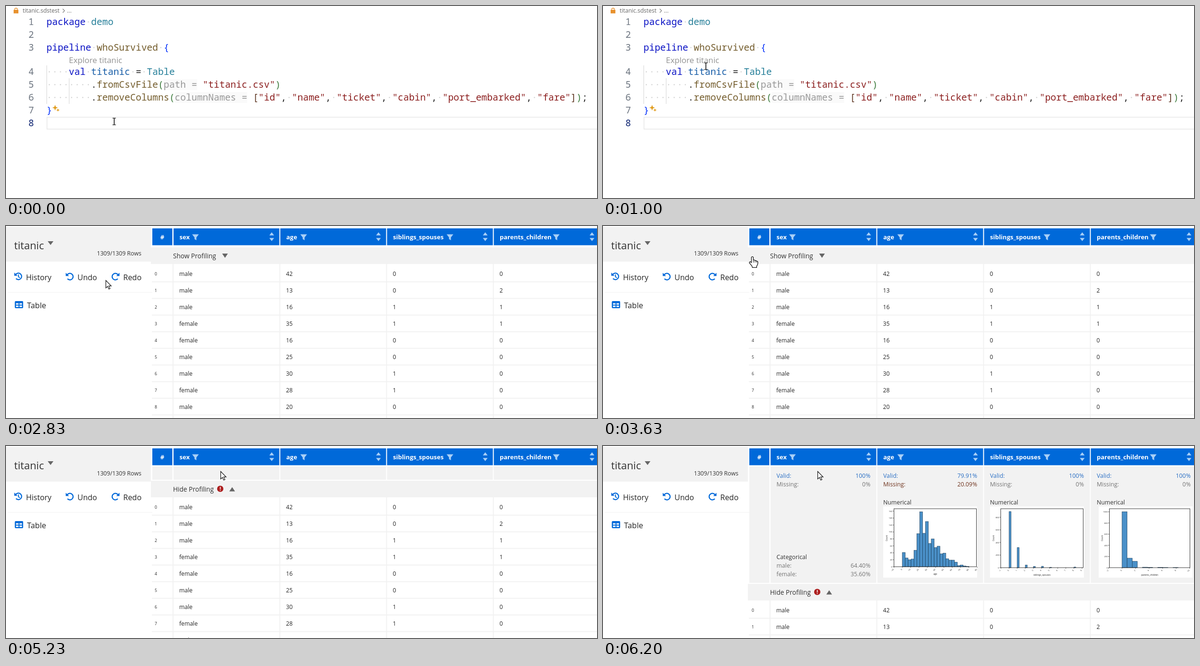
An HTML page with a canvas that plays this animation: 1240x404 px, repeating every 6.96 s.

```html
<!DOCTYPE html>
<html lang="en">
<head>
<meta charset="utf-8">
<title>Table explorer</title>
<style>
html, body { margin: 0; width: 100%; height: 100%; overflow: hidden; background: #fff; }
canvas { display: block; }
</style>
</head>
<body>
<canvas id="stage" width="1240" height="404"></canvas>
<script>
const ctx = document.getElementById('stage').getContext('2d');
const LOOP = 6960;
const OPEN = 1560, LOADED = 1680, EXPAND = 5230, GROW = 690;
const UI = '"Open Sans", "Noto Sans", sans-serif';
const MONO = '"Noto Sans Mono", "DejaVu Sans Mono", monospace';
const BLUE = '#0069d9', GREY = '#f2f2f2', INK = '#252525';
const CH = 11.7, LEFT = 85;

function rect(x, y, w, h, color) {
  ctx.fillStyle = color;
  ctx.fillRect(x, y, w, h);
}

function text(s, x, y, size, color = INK, { font = UI, weight = 400, align = 'left' } = {}) {
  ctx.font = `${weight} ${size}px ${font}`;
  ctx.textAlign = align;
  ctx.fillStyle = color;
  ctx.fillText(s, x, y);
}

function poly(points, fill, stroke, width = 1) {
  ctx.beginPath();
  points.forEach(([x, y]) => ctx.lineTo(x, y));
  ctx.closePath();
  if (fill) { ctx.fillStyle = fill; ctx.fill(); }
  if (stroke) { ctx.strokeStyle = stroke; ctx.lineWidth = width; ctx.stroke(); }
}

function line(points, color, width = 1) {
  ctx.beginPath();
  points.forEach(([x, y]) => ctx.lineTo(x, y));
  ctx.strokeStyle = color;
  ctx.lineWidth = width;
  ctx.stroke();
}

function disc(x, y, r, color) {
  ctx.beginPath();
  ctx.arc(x, y, r, 0, Math.PI * 2);
  ctx.fillStyle = color;
  ctx.fill();
}

// Triangle centred on (x, y); negative h points up
function tri(x, y, w, h, color) {
  poly([[x - w / 2, y - h / 2], [x + w / 2, y - h / 2], [x, y + h / 2]], color);
}

function at(x, y, draw) {
  ctx.save();
  ctx.translate(x, y);
  draw();
  ctx.restore();
}

const clamp = u => Math.max(0, Math.min(1, u));
const smooth = u => u * u * (3 - 2 * u);
const mix = (a, b, u) => a + (b - a) * u;

// CSS "ease" curve: cubic-bezier(.25, .1, .25, 1)
function ease(u) {
  let lo = 0, hi = 1;
  for (let i = 0; i < 20; i++) {
    const s = (lo + hi) / 2, r = 1 - s;
    if (.75 * r * r * s + .75 * r * s * s + s ** 3 < u) lo = s; else hi = s;
  }
  return .3 * (1 - lo) ** 2 * lo + 3 * (1 - lo) * lo * lo + lo ** 3;
}

// ---------- pointers ----------

function arrow(x, y) {
  at(x + .5, y - .5, () => poly([[0, 0], [0, 16], [3.7, 12.6], [6.3, 18.3], [8.9, 17.1],
    [6.3, 11.7], [11.3, 11.7]], '#fff', '#111', 1.2));
}

function hand(x, y) {
  at(x, y, () => {
    ctx.beginPath();
    ctx.moveTo(-2, 12);
    ctx.lineTo(-2, 1);
    ctx.quadraticCurveTo(0, -2, 2, 1);
    ctx.lineTo(2, 7);
    ctx.quadraticCurveTo(4.5, 5.5, 5.5, 8);
    ctx.quadraticCurveTo(8, 7, 9, 9.3);
    ctx.quadraticCurveTo(11.5, 9, 11.5, 11);
    ctx.lineTo(11, 16);
    ctx.lineTo(9, 19.5);
    ctx.lineTo(9, 22.5);
    ctx.lineTo(0, 22.5);
    ctx.lineTo(-1, 19);
    ctx.lineTo(-6, 13);
    ctx.quadraticCurveTo(-6.5, 10, -4, 10.3);
    ctx.closePath();
    ctx.fillStyle = '#fff';
    ctx.fill();
    ctx.strokeStyle = '#111';
    ctx.lineWidth = 1.3;
    ctx.stroke();
    [2, 5.5, 9].forEach(k => line([[k, 8], [k, 12]], '#111'));
  });
}

function beam(x, y) {
  line([[x, y - 7], [x, y + 7]], '#111', 1.6);
  [-7, 7].forEach(d => line([[x - 3.5, y + d], [x + 3.5, y + d]], '#111', 1.2));
}

function pointer(t) {
  if (t < OPEN) {
    const s = smooth(clamp(t / 1230));
    return [mix(227, 209, s ** 5), mix(243, 115, s)];
  }
  if (t < 3630) {
    const u = clamp((t - 3030) / 600) ** 1.4;
    return [mix(209, 313, u), mix(115, 65, u)];
  }
  const u = 1 - (1 - clamp((t - 3630) / 500)) ** 1.6;
  return [mix(313, 450, u), mix(65, 54, u)];
}

// ---------- editor ----------

const KEY = '#0a12c4', TYPE = '#267f99', FUNC = '#735c2c', STR = '#8c2020',
  VAR = '#1a5fa8', OP = '#222', HINT = '#989898', BR1 = '#0431fa', BR2 = '#3b7a3b', BR3 = '#5c3420';

const names = ['id', 'name', 'ticket', 'cabin', 'port_embarked', 'fare'];
const columns = names.flatMap((n, i) => (i ? [[',', OP], ['·'], [`"${n}"`, STR]] : [[`"${n}"`, STR]]));
const CODE = [
  [40, [['package', KEY], ['·'], ['demo', TYPE]]],
  [67, []],
  [94, [['pipeline', KEY], ['·'], ['whoSurvived', FUNC], ['·'], ['{', BR1]]],
  [145, [['····'], ['val', KEY], ['·'], ['titanic', VAR], ['·'], ['=', OP], ['·'], ['Table', TYPE]]],
  [172, [['········'], ['.', OP], ['fromCsvFile', FUNC], ['(', BR2], ['path = ', HINT],
    ['"titanic.csv"', STR], [')', BR2]]],
  [199, [['········'], ['.', OP], ['removeColumns', FUNC], ['(', BR2], ['columnNames = ', HINT],
    ['[', BR3], ...columns, [']', BR3], [')', BR2], [';', OP]]],
  [225.5, [['}', BR1]]],
  [253, []]
];

function codeLine([y, tokens], i) {
  text(String(i + 1), 47, y, 19.5, i === 7 ? '#0b216f' : '#6e7681', { font: MONO });
  let x = LEFT;
  for (const [s, color] of tokens) {
    if (!color) {
      for (let k = 0; k < s.length; k++) disc(x + (k + .5) * CH, y - 6.5, 1.3, '#d2d2d2');
    } else {
      if (color === HINT) rect(x, y - 18, (s.length - 1) * CH, 23, '#fafafa');
      text(s, x, y, 19.5, color, { font: MONO });
    }
    x += s.length * CH;
  }
}

function star(x, y, r) {
  const pts = [];
  for (let i = 0; i < 8; i++) {
    const a = i * Math.PI / 4, d = i % 2 ? r * .38 : r;
    pts.push([x + d * Math.cos(a), y + d * Math.sin(a)]);
  }
  poly(pts, '#e09b1a');
}

function editor(t) {
  const [x, y] = pointer(t), hover = y < 123;
  rect(16, 8, 10, 7.5, '#e8912d');
  ctx.beginPath();
  ctx.arc(21, 7.5, 3, Math.PI, 0);
  ctx.strokeStyle = '#e8912d';
  ctx.lineWidth = 1.5;
  ctx.stroke();
  text('titanic.sdstest', 35, 14, 12, '#666');
  line([[119, 6], [123, 10], [119, 14]], '#777', 1.1);
  text('...', 128, 14, 12, '#666');

  rect(LEFT, 125, 1, 81, '#d4d4d4');
  rect(132, 152, 1, 54, '#d4d4d4');
  ctx.strokeStyle = '#e9e9e9';
  ctx.lineWidth = 1.6;
  ctx.strokeRect(86, 234, 1160, 25);
  CODE.forEach(codeLine);
  text('Explore titanic', 132, 120, 16.9, hover ? '#0000ff' : '#929292');
  star(103, 214, 6);
  star(109, 219, 3.6);
  (hover ? hand : beam)(x, y);
}

// ---------- sidebar ----------

function turn(x, y, flip, clock) {
  at(x, y, () => {
    ctx.scale(flip, 1);
    ctx.beginPath();
    ctx.arc(0, 0, 6.8, -2.6, 2.4);
    ctx.strokeStyle = BLUE;
    ctx.lineWidth = 2.3;
    ctx.stroke();
    poly([[-8.6, -8], [-8.6, -1.2], [-1.8, -1.2]], BLUE);
    if (clock) line([[0, -4], [0, .5], [3, 3]], BLUE, 1.8);
  });
}

function sidebar(loaded) {
  rect(0, 2, 304, 73, GREY);
  text(loaded ? 'titanic' : 'undefined', 17, 48.5, 21.9, '#333');
  tri(loaded ? 93.5 : 135.5, 36, 12, 8, '#666');
  if (loaded) {
    text('1309/1309 Rows', 284, 62, 12.2, '#333', { align: 'right' });
  } else {
    text('undefined/undefined', 170, 45, 12.2, '#333');
    text('Rows', 170, 62, 12.2, '#333');
    text('Loading ...', 304, 16, 12.2, '#333');
  }
  turn(26, 106, 1, true);
  text('History', 42, 114, 16);
  turn(134, 106.5, 1);
  text('Undo', 150, 114, 16);
  turn(229.5, 106.5, -1);
  text('Redo', 246, 114, 16);
  rect(4, 139, 303, 1.5, '#f6f6f6');
  ctx.beginPath();
  ctx.roundRect(18.5, 158, 17.5, 15, 2);
  ctx.fillStyle = BLUE;
  ctx.fill();
  for (const x of [21, 28.3]) for (const y of [162.5, 167.5]) rect(x, y, 5.3, 3, '#fff');
  text('Table', 44, 173, 16.4);
}

// ---------- table ----------

const HEADS = ['sex', 'age', 'siblings_spouses', 'parents_children'];
const FUNNEL = [397.5, 624.5, 931.5, 1154.5];
const ROWS = [['male', 42, 0, 0], ['male', 13, 0, 2], ['male', 16, 1, 1], ['female', 35, 1, 1],
  ['female', 16, 0, 0], ['male', 25, 0, 0], ['male', 30, 1, 0], ['female', 28, 1, 0], ['male', 20, 0, 0]];
const colX = c => 351.5 + 224 * c;

function cells(y, h, color) {
  rect(307, y, 42, h, color);
  HEADS.forEach((_, c) => rect(colX(c), y, 222, h, color));
}

function header() {
  cells(5, 35.5, BLUE);
  text('#', 328, 28, 13, '#fff', { weight: 700, align: 'center' });
  HEADS.forEach((name, c) => {
    text(name, colX(c) + 12.5, 28, 13, '#fff', { weight: 700 });
    const x = FUNNEL[c], s = colX(c) + 206;
    poly([[x - 7, 17.5], [x + 7, 17.5], [x + 2, 24], [x + 2, 30], [x - 2, 27.5], [x - 2, 24]], '#a9d0f7');
    tri(s, 16.5, 10, -6.5, '#a9d0f7');
    tri(s, 28.5, 10, 6.5, '#a9d0f7');
  });
}

function rows(shift) {
  [350, 574, 798, 1022].forEach(x => rect(x - .5, 80 + shift, 2, 404, GREY));
  for (let r = 0; r < ROWS.length; r++) {
    const y = 105 + 35 * r + shift;
    rect(306, y + 11.5, 934, 2, GREY);
    text(String(r), 312, y - 1.5, 8.5);
    ROWS[r].forEach((v, c) => text(String(v), colX(c) + 12, y, 12.1));
  }
}

function banner(shift) {
  const y = 45 + shift;
  rect(304, y, 936, 35, GREY);
  text(shift ? 'Hide Profiling' : 'Show Profiling', 350.5, y + 22.5, 13.6, '#333');
  if (shift) {
    disc(449.5, y + 17, 6.6, '#ad1f1f');
    rect(448.8, y + 13, 1.6, 5, '#fff');
    rect(448.8, y + 19.3, 1.6, 1.7, '#fff');
    tri(474.5, y + 18, 12, -9, '#666');
  } else {
    tri(459.5, y + 17.5, 12, 9, '#666');
  }
}

// ---------- profiling ----------

const CHARTS = [
  { x: 610, right: 784, base: 254, zero: 628, unit: 1.745, scale: .731, bin: 6.08,
    bars: [41, 25, 20, 22, 47, 95, 158, 96, 130, 67, 80, 55, 59, 37, 39, 23, 19, 19, 13, 3, 5, 2, 1],
    ticks: [-10, 90, 10], marks: [160, 20] },
  { x: 834, right: 1008, base: 256, zero: 852, unit: 17, scale: .1325, bin: 4.1, step: 17,
    bars: [891, 319, 42, 20, 22, 6, 0, 0, 9], ticks: [-1, 9, 1], marks: [800, 200] },
  { x: 1062, right: 1232, base: 256, zero: 1089, unit: 14.2, scale: .1175, bin: 10.7,
    bars: [1002, 170, 113, 0, 8, 6, 0, 6, 2, 0, 2], ticks: [-2, 10, 2], marks: [1000, 200] }
];

function chart(g, name) {
  const small = { align: 'right' };
  rect(g.x - 22, 127, 197, 150, '#fff');
  g.bars.forEach((v, i) => {
    if (!v) return;
    const h = v * g.scale, x = g.zero + i * (g.step || g.bin);
    rect(x, g.base - h, g.bin, h, '#4a90c8');
    ctx.strokeStyle = '#173a56';
    ctx.lineWidth = .7;
    ctx.strokeRect(x, g.base - h, g.bin, h);
  });
  ctx.strokeStyle = '#222';
  ctx.lineWidth = .9;
  ctx.strokeRect(g.x + .5, 132, g.right - g.x - 1, g.base - 132);
  const [top, gap] = g.marks;
  for (let v = 0; v <= top; v += gap) {
    const y = g.base - v * g.scale;
    line([[g.x - 2, y], [g.x, y]], '#222', .7);
    text(String(v), g.x - 3, y + 1.5, 4.2, '#222', small);
  }
  const [from, to, by] = g.ticks;
  for (let v = from; v <= to; v += by) {
    const x = g.zero + v * g.unit;
    line([[x, g.base], [x, g.base + 2]], '#222', .7);
    at(x, g.base + 6, () => { ctx.rotate(-Math.PI / 4); text(String(v), 0, 0, 4.2, '#222', small); });
  }
  text(name, (g.x + g.right) / 2, g.base + 16.5, 4.6, '#222', { align: 'center' });
  at(g.x - 13, 194, () => { ctx.rotate(-Math.PI / 2); text('Count', 0, 0, 4.4, '#222', { align: 'center' }); });
}

function stat(c, y, label, value, color) {
  text(label, colX(c) + 12.5, y, 12.3, color);
  text(value, colX(c) + 209.5, y, 12.3, color, { align: 'right' });
}

function profiling(h) {
  cells(43, h, GREY);
  ctx.save();
  ctx.beginPath();
  ctx.rect(306, 43, 934, Math.max(0, h - 28) * 234 / 217);
  ctx.clip();
  HEADS.forEach((name, c) => {
    const gaps = c === 1, dull = '#757575';
    stat(c, 67, 'Valid:', gaps ? '79.91%' : '100%', '#2a6fc4');
    stat(c, 85, 'Missing:', gaps ? '20.09%' : '0%', gaps ? '#70351f' : dull);
    if (c) {
      text('Numerical', colX(c) + 12.5, 123, 12.3, '#333');
      chart(CHARTS[c - 1], name);
    } else {
      text('Categorical', 364, 238, 12.3, '#333');
      stat(c, 256, 'male:', '64.40%', dull);
      stat(c, 274, 'female:', '35.60%', dull);
    }
  });
  ctx.restore();
}

function explorer(t) {
  const loaded = t >= LOADED;
  const shift = t < EXPAND ? 0 : mix(28, 245, ease(clamp((t - EXPAND - 20) / GROW)));
  sidebar(loaded);
  if (loaded) {
    rows(shift);
    header();
    if (shift) profiling(shift);
    banner(shift);
  }
  const [x, y] = pointer(t);
  const over = loaded && !shift && x > 304 && y > 45 && y < 80;
  (over ? hand : arrow)(x, y);
}

function frame() {
  const t = performance.now() % LOOP;
  rect(0, 0, 1240, 404, '#fff');
  if (t < OPEN) editor(t); else explorer(t);
  requestAnimationFrame(frame);
}
frame();
</script>
</body>
</html>
```
